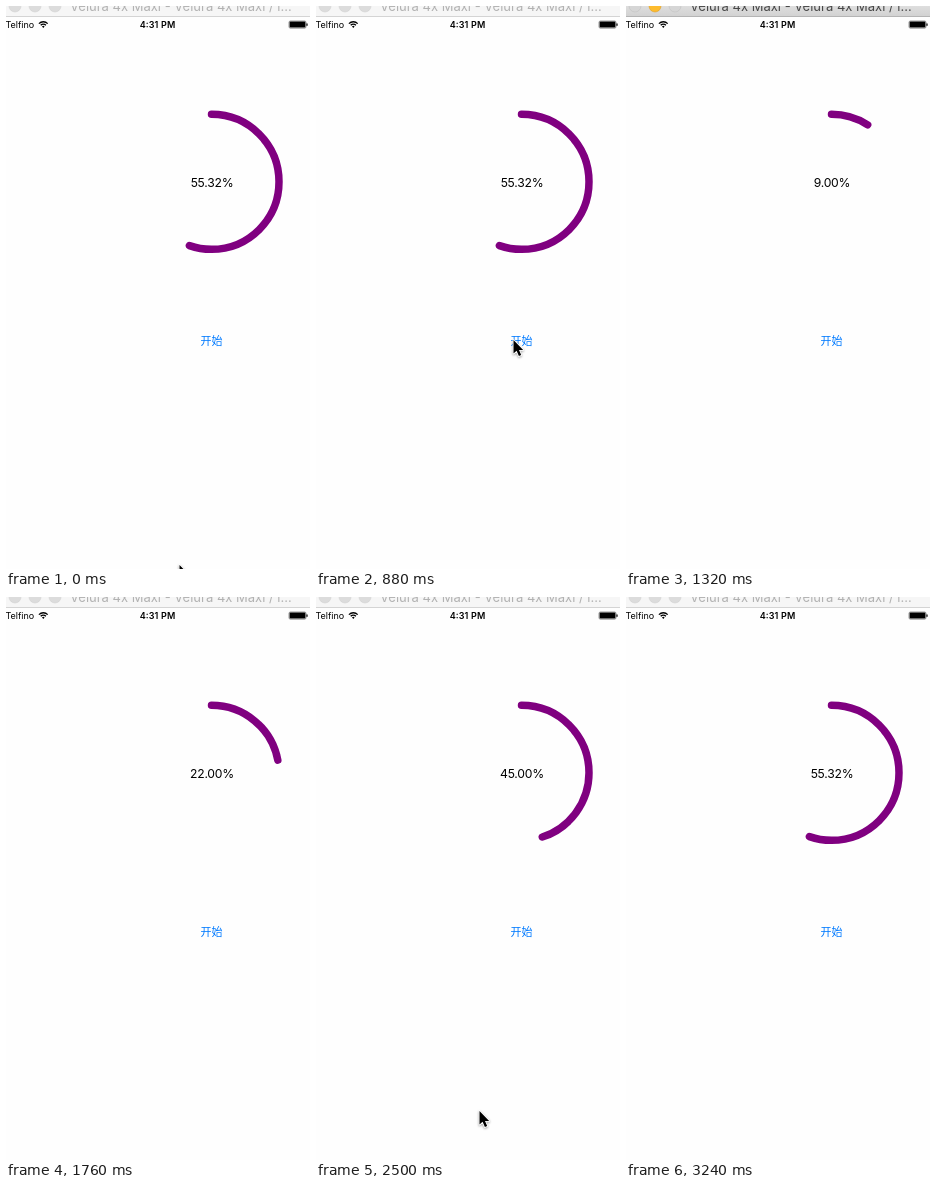
Recreate the animation shown at these times as an HTML page. Size 304 by 563 pixels, loop 3.69 s.

```html
<!DOCTYPE html>
<html lang="zh-CN">
<head>
<meta charset="utf-8">
<title>Progress ring</title>
<style>
  html, body { margin: 0; width: 100%; height: 100%; overflow: hidden; background: #fefefe; }
  svg { display: block; width: 304px; height: 563px; }
  text { font-family: Inter, Roboto, "Liberation Sans", sans-serif; }
  .bar { fill: #f6f6f6; }
  .edge { fill: #d4d4d4; }
  .light { fill: #dcdcdc; stroke: #d2d2d2; stroke-width: .6; }
  .title { font-size: 13px; fill: #b2b2b2; }
  .active .bar { fill: url(#chrome); }
  .active .edge { fill: #b4b4b4; }
  .active .light { fill: #d6d6d6; stroke: #c2c2c2; }
  .active .mid { fill: #fdbc2e; stroke: #e0a02a; }
  .active .title { fill: #484848; }
  .status { font-size: 9px; }
  .clock { font-weight: 600; text-anchor: middle; word-spacing: .6px; }
  .value { font-size: 12.2px; letter-spacing: -.25px; text-anchor: middle; }
  .button { font: 11px "Noto Sans CJK SC", "Noto Sans CJK", sans-serif; fill: #007aff; text-anchor: middle; }
  #ring { fill: none; stroke: #800080; stroke-width: 7.5; stroke-linecap: round; }
  #cursor { filter: drop-shadow(0 1px .8px rgba(0, 0, 0, .35)); }
</style>
</head>
<body>
<svg viewBox="0 0 304 563">
  <defs>
    <linearGradient id="chrome" x1="0" y1="0" x2="0" y2="1">
      <stop offset="0" stop-color="#dedede"/>
      <stop offset="1" stop-color="#d2d2d2"/>
    </linearGradient>
  </defs>

  <g id="window">
    <rect class="bar" width="304" height="10"/>
    <rect class="edge" y="10" width="304" height="1"/>
    <circle class="light" cx="9" cy="0" r="6"/>
    <circle class="light mid" cx="29" cy="0" r="6"/>
    <circle class="light" cx="49" cy="0" r="6"/>
    <text class="title" x="64" y="5">Velura 4x Maxi - Velura 4x Maxi / i…</text>
  </g>

  <text class="status" x="-.5" y="22">Telfino</text>
  <g fill="none" stroke="#000" stroke-width="1.3">
    <path d="M32.9 17.6a6.2 6.2 0 0 1 8.8 0M34.7 19.3a3.7 3.7 0 0 1 5.2 0"/>
    <path d="M37.3 22l-1.3-1.5a1.8 1.8 0 0 1 2.6 0z" fill="#000" stroke="none"/>
  </g>
  <text class="status clock" x="151.5" y="22">4:31 PM</text>
  <rect x="283" y="15" width="17" height="7.2" rx="1.4" fill="none" stroke="#000" stroke-width=".4"/>
  <rect x="283.6" y="15.6" width="15.8" height="6" rx=".8"/>
  <rect x="300.4" y="17.3" width="1.2" height="2.6" rx=".6"/>

  <circle id="ring" cx="205.5" cy="175.8" r="67.5" pathLength="100" transform="rotate(-90 205.5 175.8)"/>
  <text id="value" class="value" x="206" y="181"></text>
  <text id="button" class="button" x="205.5" y="339">开始</text>

  <path id="cursor" d="M.5 1V14.6L3.6 11.8 5.9 17.1 8.2 16.1 6 10.9H10.2Z"
        stroke="#fff" stroke-width="1.6" paint-order="stroke" stroke-linejoin="round"/>
</svg>

<script>
  const LOOP = 3690, TOTAL = 55.32;
  const $ = id => document.getElementById(id);

  // start time, percent, pointer x, pointer y (no pointer when omitted)
  const steps = [
    [0, TOTAL, 173, 558], [140, TOTAL, 173, 555], [290, TOTAL, 198, 473],
    [440, TOTAL, 197, 404], [590, TOTAL, 197, 361], [730, TOTAL, 197, 337],
    [880, TOTAL, 197, 333], [1030, 0, 205, 353], [1170, 5, 141, 538],
    [1320, 9], [1470, 13], [1610, 18], [1760, 22],
    [1910, 27, 166, 540], [2060, 31, 163, 528], [2210, 36, 167, 528],
    [2350, 41, 167, 523], [2500, 45, 163, 513], [2650, 49, 155, 508],
    [2800, 54, 155, 502], [2940, TOTAL, 158, 500], [3090, TOTAL, 224, 555],
    [3240, TOTAL]
  ];

  let shown;

  function show(step) {
    const [start, percent, x, y] = step;
    $("ring").style.display = percent ? "" : "none";
    $("ring").setAttribute("stroke-dasharray", `${percent} 200`);
    $("value").textContent = percent.toFixed(2) + "%";

    const pointer = x !== undefined;
    $("cursor").style.display = pointer ? "" : "none";
    if (pointer) $("cursor").setAttribute("transform", `translate(${x} ${y})`);

    const active = start >= 1030 && start < 1470;
    $("window").setAttribute("class", active ? "active" : "");
    // the pressed button fades back in
    $("button").style.opacity = active ? Math.min(1, .2 + (start - 1030) / 310) : 1;
  }

  function tick() {
    const t = performance.now() % LOOP;
    const step = steps.findLast(s => s[0] <= t);
    if (step !== shown) show(shown = step);
    requestAnimationFrame(tick);
  }
  tick();
</script>
</body>
</html>
```
